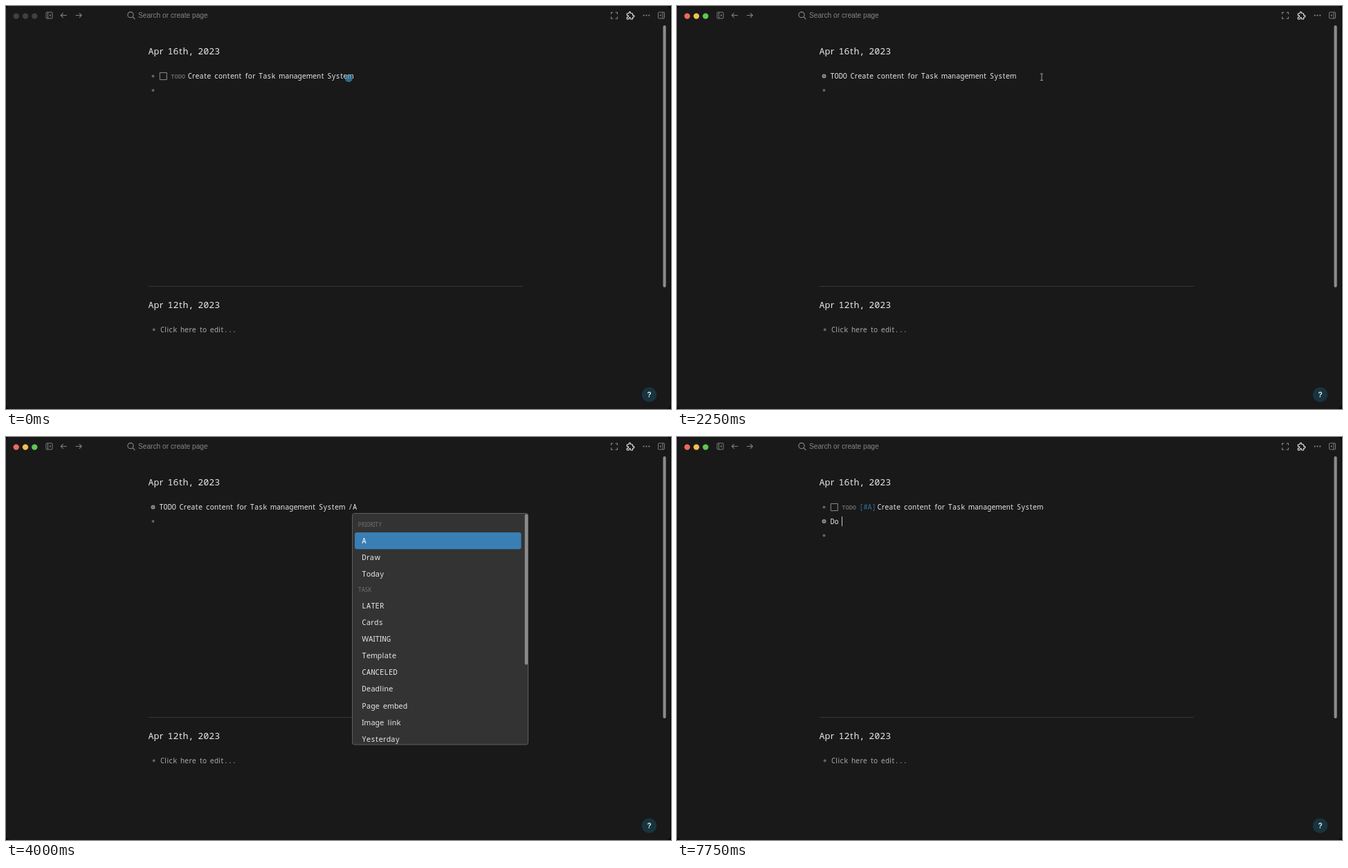
These frames come from a looping animation (961 by 583 pixels, 8 s). An HTML page with a canvas:

```html
<!DOCTYPE html>
<html lang="en">
<head>
<meta charset="utf-8">
<title>Journal</title>
<style>
  html, body { margin: 0; width: 100%; height: 100%; overflow: hidden; background: #000; }
  canvas { display: block; }
</style>
</head>
<body>
<canvas id="stage" width="961" height="583"></canvas>
<script>
const ctx = document.getElementById('stage').getContext('2d');
const LOOP = 8000, TICK = 250;
const BODY = 10.18, MENU = 10.72, TITLE = 13.3;
const BG = '#19191a', TEXT = '#e6e6e6', ICON = '#7d7d7e';
const TASK = 'Create content for Task management System';
const PUZZLE = new Path2D('M4 7h3a1 1 0 0 0 1-1v-1a2 2 0 0 1 4 0v1a1 1 0 0 0 1 1h3a1 1 0 0 1 1 1v3a1 1 0 0 0 1 1h1a2 2 0 0 1 0 4h-1a1 1 0 0 0-1 1v3a1 1 0 0 1-1 1h-3a1 1 0 0 1-1-1v-1a2 2 0 0 0-4 0v1a1 1 0 0 1-1 1h-3a1 1 0 0 1-1-1v-3a1 1 0 0 1 1-1h1a2 2 0 0 0 0-4h-1a1 1 0 0 1-1-1v-3a1 1 0 0 1 1-1');

// Editor states: start time, edited line, its text
const EDITS = [
  [750, 1, ''],
  [1750, 0, 'TODO ' + TASK],
  [3000, 0, 'TODO ' + TASK + ' '],
  [3250, 0, 'TODO ' + TASK + ' /'],
  [3500, 0, 'TODO ' + TASK + ' /A'],
  [4500, 0, 'TODO [#A] ' + TASK],
  [5250, 1, ''],
  [7500, 1, 'D'],
  [7750, 1, 'Do ']
];

// A leading # marks a group heading
const ALL_COMMANDS = ['#BASIC', 'Page reference', 'Page embed', 'Block reference', 'Block embed',
  'Link', 'Image link', 'Underline', 'Template', 'Upload an asset', 'h1', 'h2', 'h3', 'h4'];
const A_COMMANDS = ['#PRIORITY', 'A', 'Draw', 'Today', '#TASK', 'LATER', 'Cards', 'WAITING', 'Template',
  'CANCELED', 'Deadline', 'Page embed', 'Image link', 'Yesterday'];

// Four-width typeface: cell width in units of 0.6 em
function cell(ch) {
  if ('ilIj'.includes(ch)) return 0.5;
  if ('rtf '.includes(ch)) return 0.75;
  if ('mwMW'.includes(ch)) return 1.5;
  return 1;
}

function widthOf(text, size) {
  return [...text].reduce((sum, ch) => sum + cell(ch), 0) * size * 0.6;
}

function write(text, x, y, size = BODY, color = TEXT, weight = 500) {
  ctx.fillStyle = color;
  ctx.textAlign = 'center';
  for (const ch of text) {
    const units = cell(ch), w = units * size * 0.6;
    const family = units === 1 ? '"Noto Sans Mono", monospace' : '"Noto Sans", sans-serif';
    ctx.font = `${weight} ${size}px ${family}`;
    ctx.fillText(ch, x + w / 2, y);
    x += w;
  }
}

function disc(x, y, r, color) {
  ctx.fillStyle = color;
  ctx.beginPath();
  ctx.arc(x, y, r, 0, Math.PI * 2);
  ctx.fill();
}

function box(x, y, w, h, r, fill, stroke) {
  ctx.beginPath();
  ctx.roundRect(x, y, w, h, r);
  if (fill) { ctx.fillStyle = fill; ctx.fill(); }
  if (stroke) { ctx.strokeStyle = stroke; ctx.lineWidth = 1; ctx.stroke(); }
}

function line(points, color, width = 1, closed = false) {
  ctx.beginPath();
  points.forEach(([x, y]) => ctx.lineTo(x, y));
  if (closed) ctx.closePath();
  ctx.strokeStyle = color;
  ctx.lineWidth = width;
  ctx.stroke();
}

function bullet(x, y, active) {
  if (!active) return disc(x, y, 2, '#626263');
  disc(x, y, 3, '#8a9393');
  disc(x, y, 1.5, '#5b6263');
}

function panelIcon(x, dir) {
  box(x - 4.5, 9, 9, 9, 1, null, ICON);
  line([[x - dir * 2, 9], [x - dir * 2, 18]], ICON);
  ctx.fillStyle = ICON;
  ctx.beginPath();
  ctx.moveTo(x + dir * 0.5, 11.5);
  ctx.lineTo(x + dir * 2.7, 13.5);
  ctx.lineTo(x + dir * 0.5, 15.5);
  ctx.fill();
}

function arrowIcon(x, dir) {
  const tip = x + dir * 4.3;
  line([[x - dir * 4.3, 13.5], [tip, 13.5]], ICON, 1.1);
  line([[tip - dir * 3.4, 10.1], [tip, 13.5], [tip - dir * 3.4, 16.9]], ICON, 1.1);
}

function toolbar(focused) {
  ['#ec6a5e', '#f4bf4f', '#61c554'].forEach((c, i) =>
    disc(14.7 + i * 13.3, 14.6, 4.2, focused ? c : '#404041'));
  panelIcon(62.5, 1);
  arrowIcon(83.5, -1);
  arrowIcon(105, 1);

  ctx.strokeStyle = '#8a8a8b';
  ctx.lineWidth = 1.1;
  ctx.beginPath();
  ctx.arc(180, 12.7, 4.1, 0, Math.PI * 2);
  ctx.stroke();
  line([[183, 15.7], [186.3, 19]], '#8a8a8b', 1.1);
  ctx.fillStyle = '#858586';
  ctx.textAlign = 'left';
  ctx.font = `${BODY}px "Liberation Sans", Arial, sans-serif`;
  ctx.fillText('Search or create page', 191, 17.2);

  for (const sx of [-1, 1]) for (const sy of [-1, 1]) {
    const x = 879 + sx * 4.5, y = 13.7 + sy * 4.5;
    line([[x - sx * 2.8, y], [x, y], [x, y - sy * 2.8]], '#8a8a8b', 1.1);
  }
  ctx.save();
  ctx.translate(895.6, 6.6);
  ctx.scale(0.59, 0.59);
  ctx.strokeStyle = '#e4e4e4';
  ctx.lineWidth = 2;
  ctx.stroke(PUZZLE);
  ctx.restore();
  [921.7, 925.5, 929.3].forEach(x => disc(x, 13.6, 1.1, '#858586'));
  panelIcon(947, -1);
}

function page() {
  write('Apr 16th, 2023', 205.5, 70.4, TITLE);
  line([[206, 405.5], [747, 405.5]], '#373738');
  write('Apr 12th, 2023', 205.5, 437.4, TITLE);
  bullet(213.7, 468.3, false);
  write('Click here to edit...', 223, 472.2, BODY, '#a8a8a8');
  box(949.5, 28, 4.2, 379, 2.1, '#8b8b8c');
  disc(929.5, 562.3, 10.7, '#17343f');
  ctx.fillStyle = '#f0f0f0';
  ctx.textAlign = 'center';
  ctx.font = 'bold 10px "Liberation Sans", Arial, sans-serif';
  ctx.fillText('?', 929.5, 566);
}

function taskView(prioritised) {
  box(222.3, 96.4, 10, 10.2, 0, null, '#8c8c8d');
  write('TODO', 238.2, 105.1, 8.7, '#626263', 700);
  if (prioritised) write('[#A]', 263.3, 105.1, BODY, '#2f7195');
  write(TASK, prioritised ? 289.5 : 262.8, 105.1);
}

function menu(items, thumbEnd) {
  box(500.5, 110.5, 254, 334.5, 3, '#333333', '#5f5f60');
  ctx.save();
  ctx.beginPath();
  ctx.rect(501, 111, 253, 333.5);
  ctx.clip();
  box(504, 138, 240.5, 24.2, 3, '#397fb5');
  let y = 127.5;
  items.forEach((item, i) => {
    if (item[0] === '#') {
      if (i) y -= 1.2;
      write(item.slice(1), 508.8, y + 2.9, 8.15, '#717172');
      y += 22.8;
    } else {
      write(item, 514.3, y + 3.9, MENU, y < 160 ? '#ffffff' : TEXT);
      y += 24.08;
    }
  });
  box(749.7, 111.5, 4.3, thumbEnd - 111.5, 2, '#8b8b8c');
  ctx.restore();
}

function arrowCursor(x, y) {
  const pts = [[0, 0], [0, 9.6], [2.3, 7.6], [3.8, 11], [5.3, 10.3], [3.9, 7.1], [6.9, 6.9]]
    .map(([dx, dy]) => [x + dx, y + dy]);
  line(pts, '#d0d0d0', 1.1, true);
  ctx.fillStyle = '#111112';
  ctx.fill();
}

function pointer(t) {
  if (t < 250) disc(495.3, 104.7, 5.4, 'rgba(60,150,195,0.65)');
  else if (t < 500) disc(530, 98.5, 10.5, 'rgba(60,150,195,0.3)');
  else if (t < 750) return;
  else if (t < 1000) arrowCursor(515.6, 112.5);
  else if (t < 1750) arrowCursor(525.6, 99.6);
  else if (t < 2750) {
    line([[527, 98.5], [527, 107]], '#a0a0a0');
    line([[525, 98], [529, 98]], '#a0a0a0');
    line([[525, 107.5], [529, 107.5]], '#a0a0a0');
  }
}

function draw(t) {
  const [start, row, text] = EDITS.findLast(e => t >= e[0]) || [0, -1, ''];
  const added = t >= 5250;
  const rowY = i => 101.4 + i * 20.6;

  ctx.fillStyle = '#050505';
  ctx.fillRect(0, 0, 961, 583);
  box(0, 0, 960, 583, 6, BG);
  toolbar(t >= 750);
  page();

  for (let i = 0; i < (added ? 3 : 2); i++) bullet(212.5, rowY(i), i === row);
  if (row !== 0) taskView(added);
  if (row >= 0) {
    write(text, 221.5, rowY(row) + 3.7);
    if ((t - start) % 1000 < 500) {
      ctx.fillStyle = '#c8c8c8';
      ctx.fillRect(Math.round(221.5 + widthOf(text, BODY)), Math.round(rowY(row) - 7), 1, 14);
    }
  }
  if (t >= 3250 && t < 3750) menu(ALL_COMMANDS, 208);
  else if (t >= 3750 && t < 4500) menu(A_COMMANDS, 329.5);
  pointer(t);
}

const origin = performance.now();
function frame() {
  const t = (performance.now() - origin) % LOOP;
  draw(Math.floor(t / TICK) * TICK);
  requestAnimationFrame(frame);
}
frame();
</script>
</body>
</html>
```
